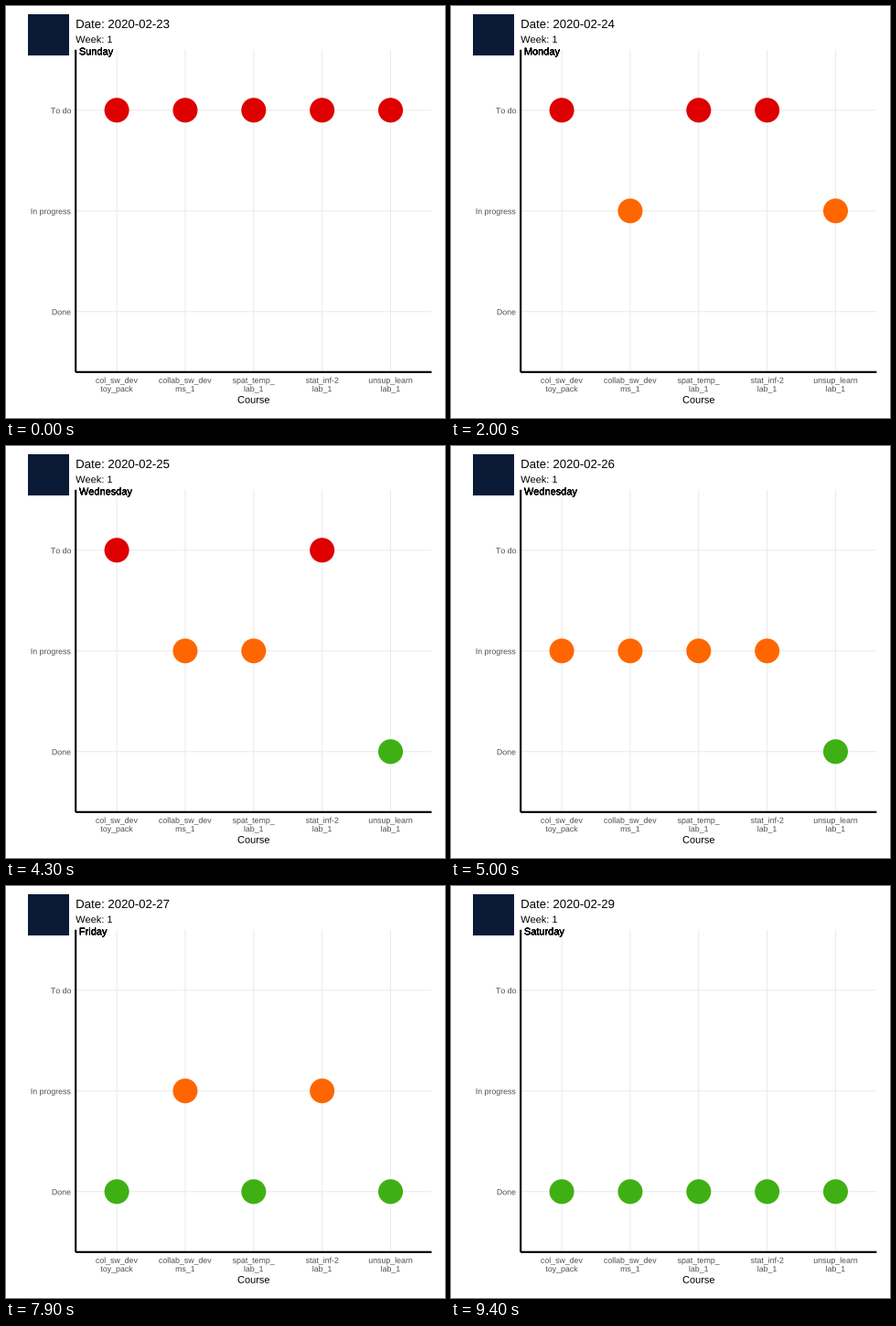
Animation of 480 by 450 pixels, one loop 10000 ms. Source, as a matplotlib script:

```python
import matplotlib.pyplot as plt
import numpy as np
from matplotlib.animation import FuncAnimation
from matplotlib.patches import Circle, PathPatch, Rectangle
from matplotlib.path import Path
from matplotlib.textpath import TextPath

plt.rcParams["font.family"] = "Liberation Sans"
plt.rcParams["text.kerning_factor"] = 6  # plain advances, no pair kerning

W, H, DPI = 480, 450, 100
PX = 72 / DPI  # points per pixel
FRAMES, STEP_MS = 100, 100

COL_GAP, ROW_GAP, RADIUS = 74.85, 110, 13.5
COLS = [121.1 + COL_GAP * i for i in range(5)]
ROWS = [113.8 + ROW_GAP * i for i in range(3)]
LEFT, RIGHT = COLS[0] - 0.6 * COL_GAP, COLS[-1] + 0.6 * COL_GAP
TOP, BOTTOM = ROWS[0] - 0.6 * ROW_GAP, ROWS[-1] + 0.6 * ROW_GAP

STATUS = ["To do", "In progress", "Done"]
COLORS = ["#DE0000", "#FF6600", "#3FB013"]
TASKS = [
    ("col_sw_dev", "toy_pack"),
    ("collab_sw_dev", "ms_1"),
    ("spat_temp_", "lab_1"),
    ("stat_inf-2", "lab_1"),
    ("unsup_learn", "lab_1"),
]

DAYS = ["Sunday", "Monday", "Tuesday", "Wednesday",
        "Thursday", "Friday", "Saturday"]
# One digit per task: its row on that day
BOARD = ["00000", "01001", "01102", "11112", "21112", "21212", "22222"]

# Frames at which the weekday, the dots and the date switch
DAY_STARTS = [0, 13, 28, 43, 57, 72, 87]
DOT_STARTS = [0, 20, 35, 50, 64, 79, 94]
DATE_STARTS = [0, 20, 35, 50, 65, 80, 94]

fig = plt.figure(figsize=(W / DPI, H / DPI), dpi=DPI, facecolor="white")
ax = fig.add_axes([0, 0, 1, 1])
ax.set_xlim(0, W)
ax.set_ylim(H, 0)
ax.axis("off")


def line(x0, y0, x1, y1, color, width, z):
    ax.plot([x0, x1], [y0, y1], color=color, lw=width * PX, zorder=z,
            solid_capstyle="butt", snap=False)


def glyphs(x, y, text, size, align=0):
    """Outline of text on baseline y; align 0 left, 0.5 centre, 1 right."""
    path = TextPath((0, 0), text, size=size)
    box = path.get_extents()
    shift = align * (box.x0 + box.x1)
    return Path(path.vertices * [1, -1] + [x - shift, y], path.codes)


def label(x, y, text, size, color="black", align=0):
    patch = PathPatch(glyphs(x, y, text, size, align), fc=color, lw=0,
                      snap=False, zorder=5)
    return ax.add_patch(patch)


def current(starts, frame):
    return int(np.searchsorted(starts, frame, side="right")) - 1


def date_path(day):
    return glyphs(76.2, 24.1, f"Date: 2020-02-{23 + day}", 13.2)


def day_path(day):
    return glyphs(79.9, 53.3, DAYS[day], 11)


for y, name in zip(ROWS, STATUS):
    line(LEFT, y, RIGHT, y, "#EBEBEB", 1.07, 1)
    label(71.3, y + 3.5, name, 8.8, "#4D4D4D", 1)
for x, (first, second) in zip(COLS, TASKS):
    line(x, TOP, x, BOTTOM, "#EBEBEB", 1.07, 1)
    label(x, 411.8, first, 8.8, "#4D4D4D", 0.5)
    label(x, 421.2, second, 8.8, "#4D4D4D", 0.5)

line(LEFT, TOP, LEFT, BOTTOM, "black", 2.13, 2)
line(LEFT, BOTTOM, RIGHT, BOTTOM, "black", 2.13, 2)
label((LEFT + RIGHT) / 2, 433.7, "Course", 11, align=0.5)
label(76.2, 40.2, "Week: 1", 11)
ax.add_patch(Rectangle((24, 9), 45, 45, fc="#0A1A36", lw=0, zorder=3))

date = ax.add_patch(PathPatch(date_path(0), fc="black", lw=0, snap=False))
# The weekday is overprinted once per task, which thickens it
weekday = [ax.add_patch(PathPatch(day_path(0), fc="black", lw=0,
                                  snap=False, zorder=5)) for _ in TASKS]
dots = [ax.add_patch(Circle((x, ROWS[0]), RADIUS, lw=0, zorder=4))
        for x in COLS]


def draw(frame):
    date.set_path(date_path(current(DATE_STARTS, frame)))
    name = day_path(current(DAY_STARTS, frame))
    for patch in weekday:
        patch.set_path(name)
    for dot, x, digit in zip(dots, COLS, BOARD[current(DOT_STARTS, frame)]):
        row = int(digit)
        dot.center = (x, ROWS[row])
        dot.set_facecolor(COLORS[row])
    return [date, *weekday, *dots]


anim = FuncAnimation(fig, draw, frames=FRAMES, interval=STEP_MS,
                     repeat=True, repeat_delay=0, blit=False)
plt.show()
```
